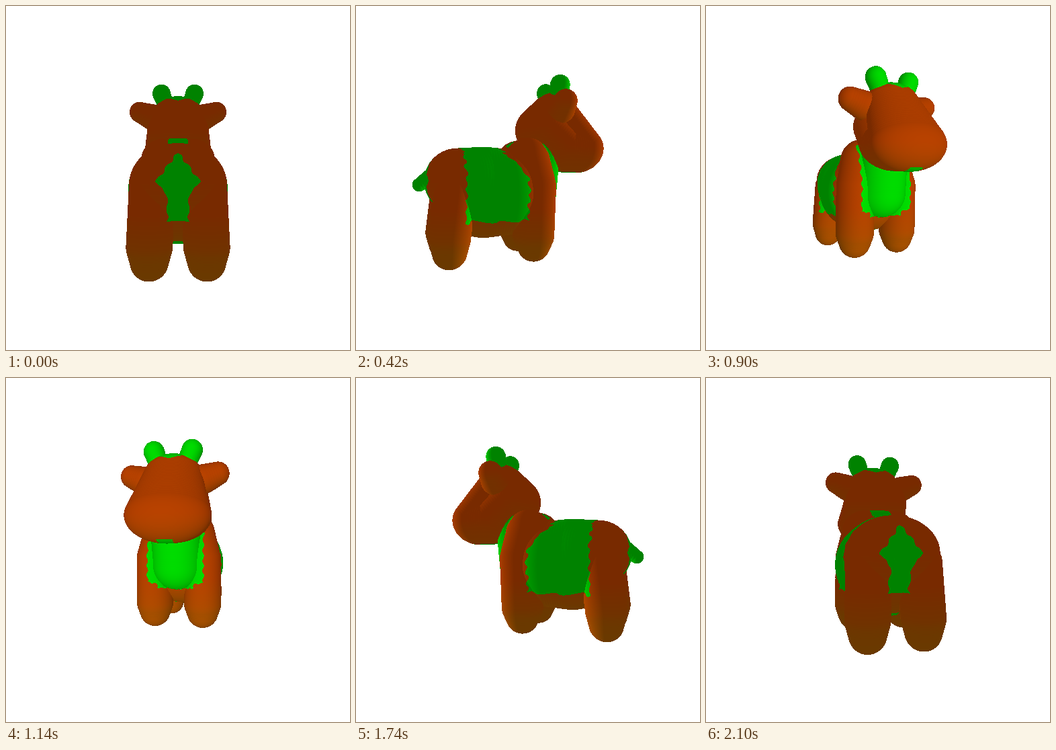
An HTML page with a canvas for the animation above (2160 ms loop, 512x512 px).

```html
<!DOCTYPE html>
<html lang="en">
<head>
<meta charset="utf-8">
<title>Turning toy cow</title>
<style>
  html, body { margin: 0; width: 100%; height: 100%; overflow: hidden; background: #fff; }
  canvas { display: block; width: 512px; height: 512px; }
</style>
</head>
<body>
<canvas id="stage" width="512" height="512"></canvas>
<script>
const SIZE = 512, HALF = SIZE / 2, STEPS = 36, STEP_MS = 60, CAM = 500, SPACING = 3.5;

// Model space: x across, y up, z towards the nose.
// A limb is swept along nodes of x, y, z, radius and relative width.
const blobs = [];

function addBlob(kind, [x, y, z, r, width]) {
  blobs.push({ kind, x, y, z, r, rx: r * width });
  if (x > 0) blobs.push({ kind, x: -x, y, z, r, rx: r * width });
}

function limb(kind, ...nodes) {
  for (let n = 1; n < nodes.length; n++) {
    const a = nodes[n - 1], b = nodes[n];
    const count = Math.ceil(Math.hypot(b[0] - a[0], b[1] - a[1], b[2] - a[2]) / SPACING);
    for (let i = 0; i <= count; i++) {
      addBlob(kind, a.map((v, k) => v + (b[k] - v) * i / count));
    }
  }
}

const crown = [0, 100, 41, 31, 1.32];
limb('head', crown, [0, 72, 20, 37, 1.28], [0, 45, 50, 36, 1.5], [0, 44, 80, 36, 1.53], crown);
limb('horn', [26.5, 135.5, 40, 14.5, 1], [18, 114, 42, 13, 1]);
limb('ear', [60.5, 104, 32, 16, 1], [42, 97, 34, 20, 1]);
limb('body', [0, 58, 18, 32, 1.15], [0, -22, 6, 36, 1.05]);
limb('body', [0, -20, -36, 62, 1.05], [0, -20, -66, 64, 0.98], [0, -4, -103, 45, 1.25]);
limb('body', [22, 25, -9, 32, 1], [36, -12, -3, 30, 0.9], [36, -78, -5, 29, 0.95], [36, -92, -5, 23, 1]);
limb('body', [30, -15, -110, 27, 1], [32.5, -78, -118, 26.5, 1], [32.5, -95, -118, 22, 1]);
limb('tail', [0, 5, -134, 12, 1], [0, -9, -154, 9, 1]);

function isGreen(kind, x, y, z) {
  if (kind === 'horn' || kind === 'tail') return true;
  if (kind === 'ear') return false;
  const ax = Math.abs(x);
  if (kind === 'head') return y > 119 + ax * 0.35 || (y < 13 && ax < 10);

  const wave = 2.5 * Math.sin(y * 0.45 + z * 0.2) + 1.5 * Math.sin(ax * 0.7);
  const chest = z > 8 && ax < 40 + wave && y > -60 + ax * 0.35 + wave;
  const saddle = z > -101 + wave * 0.6 && y > -56 + wave * 0.6 &&
    z < -20 - Math.max(0, y) * 0.75 + wave;
  const belly = y < -76 && ax < 9 && z > -100 && z < -20;
  const neck = y > 45 && y < 57 && ax < 14 && z > -30;
  const taper = y > -4 ? 24 - (y + 4) * 0.75 : Math.max(11, 24 + (y + 4) * 0.9);
  const rump = z < -110 && y > -48 && ax < taper + wave * 0.5;
  return chest || saddle || belly || neck || rump;
}

function shade(b, x, y, z) {
  const nx = (x - b.x) / (b.rx * b.rx);
  const ny = (y - b.y) / (b.r * b.r), nz = (z - b.z) / (b.r * b.r);
  const len = Math.hypot(nx, ny, nz);
  const light = Math.max(0, nz / len);
  if (isGreen(b.kind, x, y, z)) return [0, 130 + 90 * light];
  const low = Math.min(1, Math.max(0, (-40 - y) / 55));
  const olive = Math.min(1, low * 0.8 + Math.max(0, -ny / len) * 0.5);
  return [120 + 64 * light - 14 * olive, 42 + 24 * light + 15 * olive];
}

const stage = document.getElementById('stage').getContext('2d');
const depth = new Float32Array(SIZE * SIZE);
const owner = new Int16Array(SIZE * SIZE);

function trace(turn) {
  const cos = Math.cos(turn), sin = Math.sin(turn);
  const camX = CAM * sin, camZ = -CAM * cos;
  depth.fill(9);
  owner.fill(-1);

  blobs.forEach((b, id) => {
    const scale = CAM / (CAM - b.x * sin + b.z * cos);
    const midX = HALF + (b.x * cos + b.z * sin) * scale, midY = HALF - b.y * scale;
    const spanX = Math.hypot(b.rx * cos, b.r * sin) * scale * 1.12 + 3;
    const spanY = b.r * scale * 1.12 + 3;
    const ox = (camX - b.x) / b.rx, oy = -b.y / b.r, oz = (camZ - b.z) / b.r;
    const c = ox * ox + oy * oy + oz * oz - 1;

    for (let j = Math.floor(midY - spanY); j < midY + spanY; j++) {
      const dy = (HALF - j - 0.5) / b.r;
      for (let i = Math.floor(midX - spanX); i < midX + spanX; i++) {
        const u = i + 0.5 - HALF;
        const dx = (u * cos - camX) / b.rx, dz = (u * sin - camZ) / b.r;
        const a = dx * dx + dy * dy + dz * dz;
        const h = ox * dx + oy * dy + oz * dz;
        const disc = h * h - a * c;
        if (disc < 0) continue;
        const t = (-h - Math.sqrt(disc)) / a, k = j * SIZE + i;
        if (t < depth[k]) {
          depth[k] = t;
          owner[k] = id;
        }
      }
    }
  });
}

function render(step) {
  const turn = step / STEPS * 2 * Math.PI;
  const cos = Math.cos(turn), sin = Math.sin(turn);
  const camX = CAM * sin, camZ = -CAM * cos;
  const image = stage.createImageData(SIZE, SIZE);
  image.data.fill(255);
  trace(turn);

  for (let k = 0; k < owner.length; k++) {
    if (owner[k] < 0) continue;
    const u = k % SIZE + 0.5 - HALF, v = HALF - Math.floor(k / SIZE) - 0.5, t = depth[k];
    const [red, green] = shade(blobs[owner[k]],
      camX + t * (u * cos - camX), t * v, camZ + t * (u * sin - camZ));
    image.data[k * 4] = red;
    image.data[k * 4 + 1] = green;
    image.data[k * 4 + 2] = 0;
  }
  return image;
}

const views = [];
let shown = -1;

function tick() {
  const step = Math.floor(performance.now() / STEP_MS) % STEPS;
  if (step !== shown) {
    views[step] = views[step] || render(step);
    stage.putImageData(views[step], 0, 0);
    shown = step;
  }
  requestAnimationFrame(tick);
}
tick();
</script>
</body>
</html>
```
